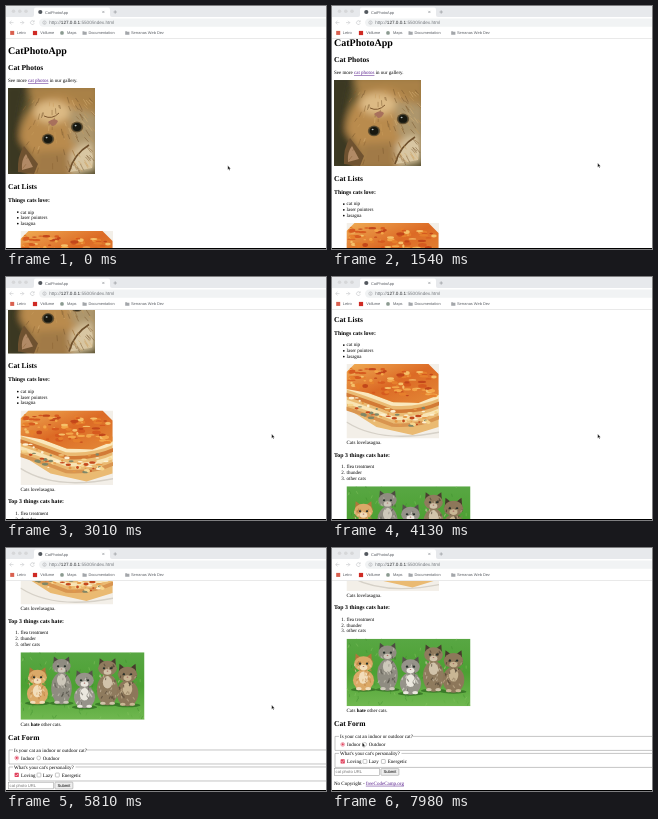
An HTML page for the animation above (8000 ms loop, 320x243 px).

```html
<!DOCTYPE html>
<html lang="en">
<head>
<meta charset="utf-8">
<title>CatPhotoApp</title>
<style>
  html, body { margin: 0; width: 100%; height: 100%; overflow: hidden; background: #fff; }
  svg { display: block; width: 100vw; height: 100vh; }
  text { text-rendering: geometricPrecision; white-space: pre; }
  #page text { font: 5px "Liberation Serif", "Times New Roman", serif; fill: #000; }
  #page .h1 { font-size: 10px; font-weight: 700; }
  #page .h2 { font-size: 7.5px; font-weight: 700; }
  #page .h3 { font-size: 5.85px; font-weight: 700; }
  #page .ui { font: 4.17px "Liberation Sans", Arial, sans-serif; }
  .link { fill: #551a8b; text-decoration: underline; }
  .bold { font-weight: 700; }
  #bar text { font: 3.9px "Liberation Sans", Arial, sans-serif; fill: #5a5e64; }
  #bar .url { font-size: 4.65px; fill: #74787d; }
  .host { fill: #26282b; }
  .line { fill: none; stroke: #8e9196; stroke-width: .6; }
  .faint { stroke: #c3c5c8; }
  .frame { fill: none; stroke: #8a8a8a; stroke-width: .5; }
  .box { fill: #fff; stroke: #858585; stroke-width: .45; }
  .on { fill: #e0405c; }
</style>
</head>
<body>
<svg viewBox="0 0 320 243" preserveAspectRatio="none">
  <defs>
    <clipPath id="view"><rect y="33" width="320" height="210"/></clipPath>
    <clipPath id="kittenBox"><rect width="87" height="86"/></clipPath>
    <clipPath id="lasagnaBox"><rect width="92.5" height="74.5"/></clipPath>
    <clipPath id="groupBox"><rect width="124" height="67.5"/></clipPath>
    <filter id="soft" x="-10%" y="-10%" width="120%" height="120%"><feGaussianBlur stdDeviation=".7"/></filter>
    <filter id="haze" x="-20%" y="-20%" width="140%" height="140%"><feGaussianBlur stdDeviation="3.5"/></filter>
    <linearGradient id="dusk" x1="0" y1="0" x2="1" y2=".6">
      <stop offset="0" stop-color="#403f25"/><stop offset=".55" stop-color="#6f6036"/><stop offset="1" stop-color="#4d4526"/>
    </linearGradient>
    <linearGradient id="lawn" x1="0" y1="0" x2="0" y2="1">
      <stop offset="0" stop-color="#58a743"/><stop offset=".5" stop-color="#4ca033"/><stop offset="1" stop-color="#70b850"/>
    </linearGradient>
    <linearGradient id="crust" x1="0" y1="0" x2="1" y2="1">
      <stop offset="0" stop-color="#f0ad55"/><stop offset=".5" stop-color="#dc6a25"/><stop offset="1" stop-color="#e48a38"/>
    </linearGradient>
  </defs>

  <rect width="320" height="243" fill="#fff"/>
  <g clip-path="url(#view)">
    <g id="page">
      <text class="h1" x="2" y="48">CatPhotoApp</text>
      <text class="h2" x="2" y="64.2">Cat Photos</text>
      <text x="2" y="76.2">See more <tspan class="link">cat photos</tspan> in our gallery.</text>

      <g transform="translate(2 82)" clip-path="url(#kittenBox)">
        <rect width="87" height="86" fill="url(#dusk)"/>
        <g filter="url(#haze)">
          <path d="M20 -4H91V34L60 24L25 28Z" fill="#a98146"/>
          <path d="M14 36Q22 12 44 8T84 30L90 70L66 90H22Q6 62 14 36Z" fill="#b98b4e"/>
          <path d="M60 20L91 26V60L64 56Z" fill="#ad966c"/>
          <path d="M62 66Q76 50 86 58L88 82L64 88Z" fill="#d3c09a"/>
          <path d="M28 64L60 62L62 90H24Z" fill="#a17a46"/>
          <ellipse cx="44" cy="24" rx="18" ry="11" fill="#dcba84"/>
          <path d="M-4 -4H20Q10 30 12 52L24 70L20 90H-4Z" fill="#3b3820"/>
        </g>
        <g filter="url(#soft)">
          <path d="M10 84Q9 68 16 58L30 76L26 86Z" fill="#6f5230"/>
          <path d="M14 82Q13 72 18 66L25 79Z" fill="#b18a66"/>
          <path d="M62 84Q66 66 80 58Q87 66 84 80Z" fill="#d8c6a2"/>
          <path d="M61 84Q66 66 81 57" fill="none" stroke="#6e4f2b" stroke-width="1.6"/>
          <g id="fur"></g>
          <path d="M40 34Q46 29 50 33Q48 38 44 38Z" fill="#a8705c"/>
          <path d="M36 28Q44 32 51 25" fill="none" stroke="#7d5730" stroke-width="1"/>
          <g id="eyes"></g>
        </g>
      </g>

      <text class="h2" x="2" y="182.6">Cat Lists</text>
      <text class="h3" x="2" y="196">Things cats love:</text>
      <g id="loves"></g>

      <g transform="translate(14.5 225)" clip-path="url(#lasagnaBox)">
        <rect width="92.5" height="74.5" fill="#f3efe8"/>
        <g filter="url(#soft)">
          <path d="M0 58Q34 80 94 68" fill="none" stroke="#d6d1c8" stroke-width="1.4"/>
          <path d="M0 20L45 36L92 26V63L66 71L30 63L0 44Z" fill="#eaba72"/>
          <g id="layers"></g>
          <path d="M0 8L8 0H82L92 10V31L72 39L46 38L22 29L0 25Z" fill="url(#crust)"/>
          <g id="cheese"></g>
        </g>
      </g>

      <text x="14.5" y="305.4">Cats lovelasagna.</text>
      <text class="h3" x="2" y="318">Top 3 things cats hate:</text>
      <g id="hates"></g>

      <g transform="translate(14.5 347.3)" clip-path="url(#groupBox)">
        <rect width="124" height="67.5" fill="url(#lawn)"/>
        <g filter="url(#soft)"><g id="grass"></g><g id="cats"></g></g>
      </g>

      <text x="14.5" y="420.6">Cats <tspan class="bold">hate</tspan> other cats.</text>
      <text class="h2" x="2" y="434.6">Cat Form</text>

      <path class="frame" d="M7 445H3V459H324M81 445H324"/>
      <text x="8" y="446.7">Is your cat an indoor or outdoor cat?</text>
      <circle class="box" cx="10.7" cy="453" r="1.9" style="stroke:#e0405c"/>
      <circle class="on" cx="10.7" cy="453" r="1.15"/>
      <text x="15" y="454.6">Indoor</text>
      <circle class="box" cx="32.7" cy="453" r="1.9"/>
      <text x="36.7" y="454.6">Outdoor</text>

      <path class="frame" d="M7 462H3V476H324M69.5 462H324"/>
      <text x="8" y="463.6">What's your cat's personality?</text>
      <rect class="on" x="8.6" y="467.9" width="4.2" height="4.2" rx=".6"/>
      <path d="M9.5 470L10.4 471L12 468.9" fill="none" stroke="#fff" stroke-width=".6"/>
      <text x="15" y="471.7">Loving</text>
      <rect class="box" x="31" y="468.1" width="3.9" height="3.9" rx=".6"/>
      <text x="36.8" y="471.7">Lazy</text>
      <rect class="box" x="49.4" y="468.1" width="3.9" height="3.9" rx=".6"/>
      <text x="55.8" y="471.7">Energetic</text>

      <rect class="box" x="2.3" y="477.2" width="45" height="6.7"/>
      <text class="ui" x="3.6" y="482" style="fill:#777">cat photo URL</text>
      <rect class="box" x="48.9" y="477.2" width="18" height="6.7" rx=".8" style="fill:#efefef"/>
      <text class="ui" x="51.4" y="482">Submit</text>
      <text x="2" y="493.4">No Copyright - <tspan class="link">freeCodeCamp.org</tspan></text>
    </g>
  </g>

  <g id="bar">
    <rect width="320" height="33" fill="#fff"/>
    <rect width="320" height="11" fill="#e7e9ec"/>
    <path d="M26 11Q28 11 28 9V3.5Q28 1.5 30 1.5H102Q104 1.5 104 3.5V9Q104 11 106 11Z" fill="#fff"/>
    <g fill="#d6d7d9">
      <circle cx="7.5" cy="5.3" r="1.8"/><circle cx="13.8" cy="5.3" r="1.8"/><circle cx="20" cy="5.3" r="1.8"/>
    </g>
    <circle cx="34.3" cy="6" r="2.1" fill="#53585e"/>
    <text x="38.9" y="7.5">CatPhotoApp</text>
    <path class="line" d="M96.3 4.9L98.4 7M98.4 4.9L96.3 7M109.2 4.3V7.7M107.5 6H110.9"/>
    <rect x="33" y="12.4" width="300" height="8.4" rx="4.2" fill="#f1f3f4"/>
    <path class="line faint" d="M7.5 16.6H3.7M5.5 14.8L3.7 16.6L5.5 18.4M14 16.6H17.8M16 14.8L17.8 16.6L16 18.4M28 15.6A1.9 1.9 0 1 0 28.2 17.2M28.2 14.4V15.9H26.7"/>
    <circle class="line" cx="38.5" cy="16.6" r="1.7" style="stroke-width:.4"/>
    <path class="line" d="M38.5 16.3V17.6M38.5 15.5V15.8" style="stroke-width:.4"/>
    <text class="url" x="43.2" y="18.2">http://<tspan class="host">127.0.0.1</tspan>:5500/index.html</text>
    <rect x="4.2" y="24.9" width="4" height="4" fill="#d9604f"/>
    <text x="10.8" y="28.2">Letro</text>
    <rect x="26.9" y="24.9" width="4.2" height="4.2" fill="#cf2a24"/>
    <text x="34.2" y="28.2">Vidlume</text>
    <circle cx="56" cy="26.9" r="1.9" fill="#8b9a90"/>
    <text x="61" y="28.2">Maps</text>
    <g id="folders" fill="#a3a6aa"></g>
    <text x="82.4" y="28.2">Documentation</text>
    <text x="125" y="28.2">Serranas Web Dev</text>
    <rect y="32.2" width="320" height=".7" fill="#e0e0e0"/>
  </g>
  <rect y="242" width="320" height="1" fill="#000"/>
  <path id="cursor" d="M0 0V4.1L1 3.3L1.6 4.8L2.3 4.5L1.7 3.1H2.9Z" fill="#000" stroke="#fff" stroke-width=".35"/>
</svg>

<script>
const $ = id => document.getElementById(id);
const put = (id, html) => { $(id).innerHTML = html; };
const many = (n, fn) => Array.from({ length: n }, (_, i) => fn(i)).join('');
const ell = (x, y, rx, ry, fill) => `<ellipse cx="${x}" cy="${y}" rx="${rx}" ry="${ry}" fill="${fill}"/>`;
const hair = (x, y, dx, dy, color, w) =>
  `<path d="M${x} ${y}l${dx} ${dy}" stroke="${color}" stroke-width="${w}" opacity=".6"/>`;

let seed = 7;
const rnd = (a, b) => {
  seed = (seed * 16807) % 2147483647;
  return a + (b - a) * seed / 2147483647;
};
const pick = list => list[Math.floor(rnd(0, list.length))];

// Lists
put('loves', ['cat nip', 'laser pointers', 'lasagna'].map((s, i) => {
  const y = 207.5 + i * 5.75;
  return `<circle cx="11.8" cy="${y - 1.4}" r=".85"/><text x="14.6" y="${y}">${s}</text>`;
}).join(''));
put('hates', ['flea treatment', 'thunder', 'other cats'].map((s, i) => {
  const y = 329.5 + i * 5.8;
  return `<text x="9.2" y="${y}">${i + 1}.</text><text x="14.6" y="${y}">${s}</text>`;
}).join(''));
put('folders', [76.5, 119.2].map(x =>
  `<path d="M${x} 25.2H${x + 1.6}L${x + 2.1} 25.8H${x + 4.2}V28.8H${x}Z"/>`).join(''));

// Kitten
put('fur', many(110, () => {
  const x = rnd(18, 84), y = rnd(8, 82);
  return hair(x, y, (x - 44) * .12, rnd(3, 7), pick(['#8a6233', '#dcb67a', '#75552c', '#c99d5c']), .8);
}));
put('eyes', [[40, 51], [69, 39]].map(([x, y]) =>
  ell(x, y, 6.2, 5.4, '#6a5331') + ell(x, y, 5.2, 4.6, '#45412e') +
  ell(x, y, 4.2, 3.9, '#17170f') + ell(x - 1.4, y - 1.4, 1, .8, '#b6bfc0')).join(''));

// Lasagna
put('layers', many(4, i => {
  const y = 27 + i * 7;
  const tone = ['#fae8bd', '#d27a35', '#f8e4b4', '#d99550'][i];
  return `<path d="M-2 ${y - 4}Q20 ${y + 3} 46 ${y + 13}Q72 ${y + 15} 94 ${y + 5}" fill="none" stroke="${tone}" stroke-width="3.6"/>`;
}) + many(60, () => {
  const x = rnd(2, 91), y = rnd(29, 47) + 15 * Math.sin(x / 38);
  return ell(x, y, rnd(1, 3.5), rnd(.6, 1.6), pick(['#c4481c', '#fcf0d2', '#7f8768', '#e59a47', '#f6d68f']));
}));
put('cheese', many(90, () => {
  const x = rnd(2, 90);
  return ell(x, rnd(2, 27) + x / 12, rnd(1, 4.5), rnd(.6, 2), pick(['#f5c069', '#c2461a', '#e67f2c', '#f3a648', '#d65a1f']));
}));

// Cats on the grass
put('grass', many(90, () =>
  hair(rnd(0, 124), rnd(0, 68), rnd(-2, 2), -3, pick(['#3c8a2b', '#8bc866', '#5cae40']), .7)));

const cat = ([x, y, r, foot, fur, dark, light]) => {
  const mid = (y + foot) / 2 + 4;
  const ear = s => `<path d="M${x + s * r * 1.1} ${y}L${x + s * r} ${y - r * 1.3}L${x + s * r * .2} ${y - r * .7}Z" fill="${dark}"/>`;
  const leg = s => ell(x + s * r * .6, foot - 5, 2.6, 6.5, fur) + ell(x + s * r * .6, foot, 2.9, 1.6, light);
  const coat = many(45, () =>
    hair(x + rnd(-1.1, 1.1) * r, rnd(y - r * .6, foot - 4), rnd(-2, 2), 2.5, pick([dark, light, fur]), 1.1));
  return ell(x, foot + 1, r * 1.6, 2, '#3c7b2a') +
    ell(x, mid, r * 1.35, (foot - y) / 2 - 2, fur) + leg(-1) + leg(1) +
    ear(-1) + ear(1) + ell(x, y, r * 1.2, r * .95, fur) +
    ell(x, y + r * 1.8, r * .6, r * .8, light) + coat +
    ell(x, y + r * .48, r * .5, r * .35, light) +
    ell(x - r * .45, y, 1.2, 1.1, '#28312b') + ell(x + r * .45, y, 1.2, 1.1, '#28312b') +
    ell(x, y + r * .36, .8, .6, '#a76961');
};
put('cats', [
  [41, 14, 7.6, 50, '#8f8c81', '#4c4a41', '#cdc8ba'],
  [87, 16, 7.8, 51, '#8f7b5e', '#493e2f', '#d1c3aa'],
  [17, 25, 7.8, 50, '#dba968', '#b0763a', '#f2ddba'],
  [107, 22, 8, 52, '#8d775a', '#45392b', '#c9b694'],
  [64, 28, 7.8, 54, '#96938a', '#55534b', '#ebe8df']
].map(cat).join(''));

// Motion: [ms, value...]
const LOOP = 8000;
const scroll = [[0, 0], [1190, 0], [1540, 8], [3010, 91.5], [4130, 138], [5110, 162], [5810, 243], [6580, 256.6], [LOOP, 256.6]];
const pointer = [[0, 221.8, 159.6], [50, 221.8, 159.6], [280, 267.2, 157.8], [1190, 266.6, 157.5], [1400, 265.7, 157.1],
  [6800, 265.7, 157.1], [7560, 33, 196], [7980, 30.3, 194.6], [LOOP, 30.3, 194.6]];

// Monotone cubic through the steps
function at(steps, t, c = 1) {
  let i = 0;
  while (i < steps.length - 2 && t >= steps[i + 1][0]) i++;
  const slope = k => k < 0 || k > steps.length - 2 ? 0
    : (steps[k + 1][c] - steps[k][c]) / (steps[k + 1][0] - steps[k][0]);
  const tangent = k => {
    const a = slope(k - 1), b = slope(k);
    return a * b > 0 ? 2 * a * b / (a + b) : 0;
  };
  const [p, q] = [steps[i], steps[i + 1]];
  const d = q[0] - p[0], u = (t - p[0]) / d, v = 1 - u;
  return p[c] * (1 + 2 * u) * v * v + tangent(i) * d * u * v * v
    + q[c] * u * u * (3 - 2 * u) - tangent(i + 1) * d * u * u * v;
}

const page = $('page'), cursor = $('cursor');
function draw() {
  const t = performance.now() % LOOP;
  page.setAttribute('transform', `translate(0 ${-at(scroll, t)})`);
  cursor.setAttribute('transform', `translate(${at(pointer, t)} ${at(pointer, t, 2)})`);
  requestAnimationFrame(draw);
}
draw();
</script>
</body>
</html>
```
